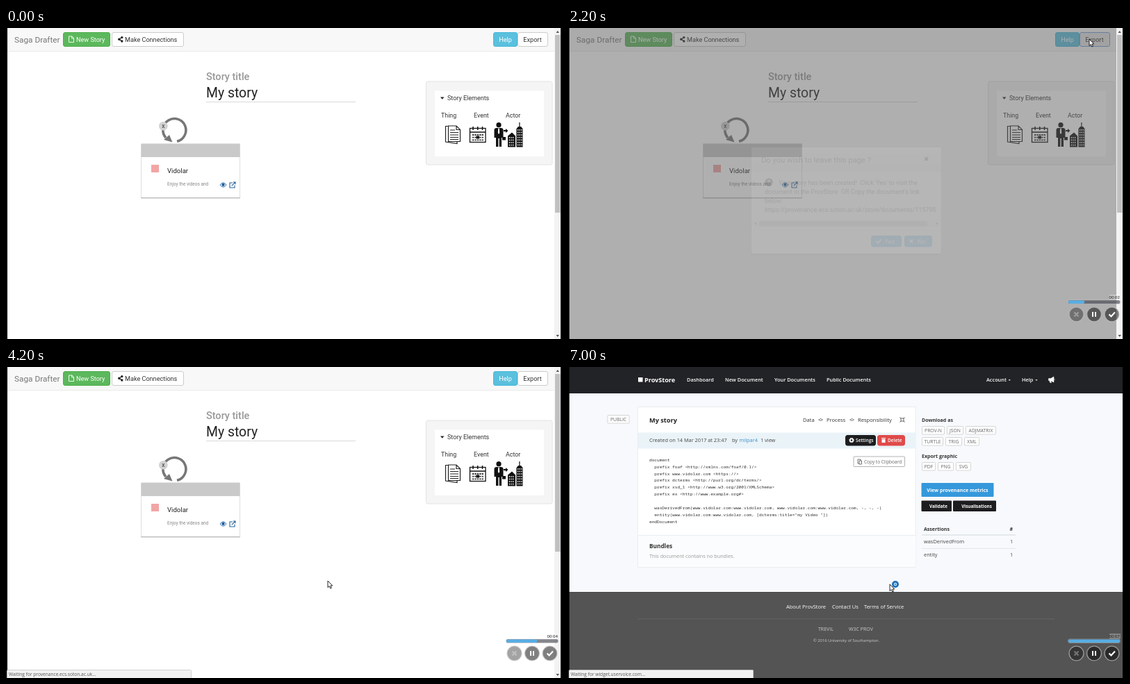
Write an HTML page that moves like this. It is 800 px wide and 448 px high and loops after 7100 ms.

```html
<!DOCTYPE html>
<html lang="en">
<head>
<meta charset="utf-8">
<title>Story export</title>
<style>
html, body { margin: 0; width: 100%; height: 100%; overflow: hidden; background: #000; }
svg { display: block; width: 800px; height: 448px; }
text { white-space: pre; }
.roboto { font-family: Roboto, sans-serif; }
.open { font-family: "Open Sans", sans-serif; }
.mono { font-family: "Noto Sans Mono", monospace; }
</style>
</head>
<body>
<svg id="stage" viewBox="0 0 800 448"></svg>
<script>
const LOOP = 7100, STEP = 100;

const text = (x, y, size, fill, str, attrs = '') =>
  `<text x="${x}" y="${y}" font-size="${size}" fill="${fill}" ${attrs}>${str.replace(/</g, '&lt;')}</text>`;
const rect = (x, y, w, h, fill, attrs = '') =>
  `<rect x="${x}" y="${y}" width="${w}" height="${h}" fill="${fill}" ${attrs}/>`;
const path = (d, fill, attrs = '') => `<path d="${d}" fill="${fill}" ${attrs}/>`;
const line = (d, color, width = 1, attrs = '') =>
  path(d, 'none', `stroke="${color}" stroke-width="${width}" ${attrs}`);
const circle = (x, y, r, fill, attrs = '') => `<circle cx="${x}" cy="${y}" r="${r}" fill="${fill}" ${attrs}/>`;
const group = (id, body, attrs = '') => `<g id="${id}" ${attrs}>${body}</g>`;
const at = (x, y, body) => `<g transform="translate(${x} ${y})">${body}</g>`;
const button = (x, y, w, h, fill, border, attrs = '') =>
  rect(x + .5, y + .5, w - 1, h - 1, fill, `rx="2.5" stroke="${border}" ${attrs}`);
const MID = ' text-anchor="middle" ', BOLD = ' font-weight="700" ', SEMI = ' font-weight="600" ';

function windows(x, y, cols, rows) {
  let out = '';
  for (let i = 0; i < cols * rows; i++)
    out += rect(x + i % cols * 2.6, y + Math.floor(i / cols) * 3.6, 1.3, 1.7, '#fff');
  return out;
}

const navBar = () =>
  rect(2, 0, 787, 34, '#f8f8f8') + rect(2, 33.3, 787, .8, '#e7e7e7') +
  text(12, 21, 11.8, '#777', 'Saga Drafter') +
  button(82, 6, 68, 21, '#5cb85c', '#4cae4c') +
  line('M90.5 12H95L97.5 14.5V20.5H90.5ZM94.7 12V15H97.5', '#fff', .9) +
  text(101, 19.7, 9.1, '#fff', 'New Story') +
  button(152, 6, 104, 21, '#fff', '#ccc') +
  line('M167 13.5L162.5 16.3L167 19', '#222', 1.1) +
  circle(166.8, 13.6, 1.7, '#222') + circle(162.8, 16.3, 1.7, '#222') + circle(166.8, 19, 1.7, '#222') +
  text(171, 19.7, 9.1, '#333', 'Make Connections') +
  button(701, 6, 35, 21, '#5bc0de', '#46b8da') + text(718.5, 19.7, 9.1, '#fff', 'Help', MID) +
  button(736, 6, 44, 21, '#fff', '#ccc', 'id="export"') + text(757.5, 19.7, 9.1, '#333', 'Export', MID);

const storyCard = () =>
  line('M246 163.2A16.5 16.5 0 1 0 230 158', '#777', 3.6) + path('M227 161L239.5 164.5L235 154Z', '#777') +
  circle(226.3, 141.3, 6.3, '#d2d2d2') + text(226.3, 144.2, 8.5, '#333', 'x', MID) +
  rect(194, 167, 143, 78.5, '#000', 'opacity=".25" rx="1"') + rect(194.5, 167, 142, 77, '#fff') +
  rect(194.5, 166.5, 142, 19.5, '#c9c9c9') +
  rect(209, 197, 11, 11, '#f2a5a5') +
  text(232, 208.8, 9.6, '#222', 'Vidolar') +
  text(232, 226.6, 6.5, '#888', 'Enjoy the videos and') +
  path('M308 226Q312.5 219.5 317 226Q312.5 232.5 308 226Z', '#fff', 'stroke="#337ab7" stroke-width="1"') +
  circle(312.5, 225.7, 2.2, '#235f97') +
  line('M326 223H322V230H329V226.5M324.7 227.3L329.5 222.5M326.8 222H330V225.3', '#2b6299', 1.1);

const elementPanel = () =>
  rect(604.5, 77, 181.5, 120, '#f5f5f5', 'stroke="#e3e3e3" rx="2.5"') +
  rect(617, 90.5, 157, 94.5, '#fff') + path('M625 99.5H630.5L627.7 102.8Z', '#222') +
  text(635, 104.3, 9, '#333', 'Story Elements') +
  text(626, 129.3, 8.9, '#333', 'Thing') + text(673, 129.3, 8.9, '#333', 'Event') +
  text(719, 129.3, 8.9, '#333', 'Actor') +
  line('M637 141.5H632.5V164L649 166.5V164', '#222', 1.2) +
  path('M636.5 141H648L653.5 146.5V163.5H636.5ZM648 141V146.5H653.5', '#fff', 'stroke="#222" stroke-width="1.2"') +
  line('M639 147H646M639 150.5H651M639 154H651M639 157.5H651M639 160.5H651', '#222', 1.1) +
  rect(667.5, 144.5, 22.5, 20, '#fff', 'stroke="#111" stroke-width="1.3"') +
  line('M667.5 150H690M672 142V147M678.7 142V147M685.5 142V147', '#111', 1.5) +
  line('M671 154H687M671 157.7H687M671 161.3H687', '#333', 1.8, 'stroke-dasharray="2.3 1.1"') +
  rect(676.5, 155.5, 4.5, 4, '#111') +
  circle(709, 139.7, 3.6, '#111') +
  path('M702.5 147Q702.5 144 706 144H712Q715.5 144 715.5 147V158H713V171H709.7V159H708.3V171H705V158H702.5Z', '#111') +
  path('M708.2 144.5H709.8L710.2 151L709 153L707.8 151Z', '#fff') +
  rect(714, 157, 5, 4.5, '#111') +
  path('M716 147H719V145L722.5 148L719 151V149H716Z', '#111') +
  path('M722 171.5V155.5L728 150.5L733 155.5V171.5Z', '#111') + windows(723.8, 157, 3, 4) +
  path('M734.5 171.5V145L737 142H738.3V136H739.5V142H741L743.5 145V171.5Z', '#111') + windows(736, 146, 3, 7);

const storyPage = () =>
  rect(2, 0, 787, 448, '#fff') + navBar() +
  text(288, 74.5, 14.5, '#999', 'Story title', 'font-weight="500"') +
  text(288, 99.7, 19.4, '#222', 'My story') + rect(288, 106, 215, .9, '#d5d5d5') +
  storyCard() + elementPanel() +
  group('shade', rect(2, 0, 787, 448, '#616161')) +
  rect(789, 0, 9, 448, '#f3f3f3') + rect(790, 10, 7.5, 256, '#c1c1c1') +
  path('M791.5 7H796L793.7 4ZM791.5 442H796L793.7 445Z', '#555');

const dialog = () =>
  rect(263.5, 172, 274, 154.5, '#000', 'opacity=".22" rx="2"') +
  rect(264, 172, 273, 153, '#fff', 'rx="2"') +
  rect(264, 172, 273, 34.5, 'url(#head)', 'rx="2"') + rect(264, 206, 273, .8, '#d5d8dd') +
  text(278, 193.5, 11.2, '#333', 'Do you wish to leave this page ?') +
  line('M513.4 186L518 190.8M518 186L513.4 190.8', '#111', 1.8) +
  circle(289, 222.3, 5.8, '#111') + text(289, 225.7, 9.5, '#fff', '?', MID + BOLD) +
  ["Your story has been created!  Click 'Yes' to visit the",
   "document in the ProvStore  OR Copy the document's link",
   'below:', 'https://provenance.ecs.soton.ac.uk/store/documents/115798']
    .map((s, i) => text(i ? 283 : 303, 225.6 + i * 13, 8.95, '#333', s)).join('') +
  rect(265, 277.5, 271, 8.5, '#f1f1f1') + rect(275, 278, 242, 7.5, '#c1c1c1') +
  path('M271 279.7V283.7L268.5 281.7ZM530 279.7V283.7L532.5 281.7Z', '#555') +
  rect(264, 291.5, 273, .6, '#e8e8e8') +
  button(436, 299, 44, 16.5, '#2196e3', '#2196e3', 'id="yes"') + text(455.5, 310.7, 9, '#fff', 'Yes') +
  line('M443.5 307L446.2 309.6L450.7 304.3', '#fff', 1.8) +
  button(484, 299, 40, 16.5, '#2196e3', '#2196e3') + text(503, 310.7, 9, '#fff', 'No') +
  line('M491.7 304.8L496.2 309.5M496.2 304.8L491.7 309.5', '#fff', 1.8);

const tag = (x, y, w, str) =>
  rect(x + .5, y + .5, w - 1, 11.5, '#fff', 'stroke="#ccc" stroke-width=".8" rx="1"') +
  text(x + w / 2, y + 8.8, 6.8, '#666', str, MID);
const diamond = x => line(`M${x - 3.5} 76H${x + 3.5}`, '#555', .7) +
  path(`M${x} 74L${x + 2} 76L${x} 78L${x - 2} 76Z`, '#fff', 'stroke="#555" stroke-width=".8"');

const storeHeader = () =>
  rect(2, 0, 796, 38, '#222326') + rect(101, 15, 6.5, 6.5, '#fff') +
  text(110, 22, 9.1, '#fff', 'ProvStore', BOLD) +
  [[171, 'Dashboard'], [226, 'New Document'], [297, 'Your Documents'], [372, 'Public Documents'],
   [602, 'Account'], [653, 'Help']].map(([x, s]) => text(x, 21.3, 7.35, '#fff', s, SEMI)).join('') +
  path('M633.5 18H637L635.2 20ZM672.3 18H675.8L674 20Z', '#ccc') +
  path('M691.5 16.5H694.5L699 14V22L694.5 19.8L695.5 22.5H693.7L692.7 19.6H691.5ZM700 16.8V19.2', '#fff', 'stroke="#fff" stroke-width=".5"');

const CODE = [
  'document',
  '  prefix foaf <http://xmlns.com/foaf/0.1/>',
  '  prefix www.vidolar.com <https://>',
  '  prefix dcterms <http://purl.org/dc/terms/>',
  '  prefix xsd_1 <http://www.w3.org/2001/XMLSchema>',
  '  prefix ex <http://www.example.org#>',
  '',
  '  wasDerivedFrom(www.vidolar.com:www.vidolar.com, www.vidolar.com:www.vidolar.com, -, -, -)',
  '  entity(www.vidolar.com:www.vidolar.com, [dcterms:title="my Video "])',
  'endDocument'
];

const documentCard = () =>
  tag(56.5, 69, 32, 'PUBLIC') +
  rect(100.5, 57.5, 399.5, 231, '#fff', 'stroke="#e6eaee" stroke-width=".8"') +
  text(117, 79.5, 9.2, '#222', 'My story', BOLD) +
  text(338, 79, 7.6, '#333', 'Data') + text(372, 79, 7.6, '#333', 'Process') +
  text(417, 79, 7.6, '#333', 'Responsibility') + diamond(363.5) + diamond(408.5) +
  rect(479, 74, 4, 4, 'none', 'stroke="#555" stroke-width=".9"') +
  line('M477.5 72.5L479 74M484.5 72.5L483 74M477.5 79.5L479 78M484.5 79.5L483 78', '#555') +
  rect(101, 94.5, 399, 23, '#eaf3f8') +
  text(117, 107.8, 7.35, '#444', 'Created on 14 Mar 2017 at 23:47') + text(236, 107.8, 7.35, '#444', 'by') +
  text(246.5, 107.8, 7.35, '#3a8fc9', 'milpar4') + text(277, 107.8, 7.35, '#444', '1 view') +
  button(399, 98, 44, 15.5, '#1d1d1f', '#1d1d1f') +
  circle(408, 105.5, 2.2, 'none', 'stroke="#fff" stroke-width="1.7"') +
  circle(408, 105.5, 3.3, 'none', 'stroke="#fff" stroke-width="1" stroke-dasharray="1.3 1.29"') +
  text(414, 108.1, 6.6, '#fff', 'Settings', SEMI) +
  button(445, 98, 40, 15.5, '#e04a4a', '#e04a4a') +
  rect(451.5, 104, 5, 5, '#fff') + rect(451, 102, 6, 1.2, '#fff') +
  text(460, 108.1, 6.6, '#fff', 'Delete', SEMI) +
  `<g class="mono">${CODE.map((s, i) => text(117, 135.7 + i * 9.93, 6.14, '#333', s)).join('')}</g>` +
  rect(411, 129, 73.5, 14.5, '#fff', 'stroke="#aaa" stroke-width=".9" rx="1"') +
  line('M417 133H421V135M417 133V139H419M419 135H422.5V140H419Z', '#555', .8) +
  text(426, 138.7, 6.5, '#666', 'Copy to Clipboard') +
  rect(101, 242, 399, 46, '#fbfcfd') + rect(101, 242, 399, .8, '#e8ecef') +
  text(117, 261, 8.25, '#333', 'Bundles', BOLD) +
  text(117, 275.3, 7.25, '#999', 'This document contains no bundles.');

const sidebar = () =>
  text(509, 79, 7.05, '#333', 'Download as', BOLD) +
  tag(509, 85, 33, 'PROV-N') + tag(545, 85, 24, 'JSON') + tag(572, 85, 44, 'ADJMATRIX') +
  tag(509, 101, 31, 'TURTLE') + tag(543, 101, 24, 'TRIG') + tag(570, 101, 22, 'XML') +
  text(509, 131.3, 7.05, '#333', 'Export graphic', BOLD) +
  tag(509, 137, 20, 'PDF') + tag(532, 137, 23, 'PNG') + tag(558, 137, 22, 'SVG') +
  rect(508.5, 167, 104, 20, '#3498db', 'rx="1"') +
  text(560.5, 179.5, 7.05, '#fff', 'View provenance metrics', MID + BOLD) +
  rect(508.5, 192.5, 43.5, 15.5, '#1d1d1f', 'rx="1"') + text(533, 202.7, 6.3, '#fff', 'Validate', MID + BOLD) +
  rect(554, 192.5, 62, 15.5, '#1d1d1f', 'rx="1"') + text(588, 202.7, 6.3, '#fff', 'Visualisations', MID + BOLD) +
  text(512, 235.5, 7.05, '#333', 'Assertions', BOLD) + text(635.5, 235.5, 7.05, '#333', '#', BOLD) +
  text(512, 254, 7.4, '#444', 'wasDerivedFrom') + text(636, 254, 7.4, '#444', '1') +
  text(512, 273, 7.4, '#444', 'entity') + text(636, 273, 7.4, '#444', '1') +
  rect(509, 241.5, 135, 1, '#d5d9dc') + rect(509, 261, 135, .8, '#dfe3e6');

const storeFooter = () =>
  rect(2, 324, 796, 124, '#545454') + rect(2, 324, 796, 1, '#484848') +
  text(314, 348.3, 7.5, '#fff', 'About ProvStore') + text(380, 348.3, 7.5, '#fff', 'Contact Us') +
  text(426, 348.3, 7.5, '#fff', 'Terms of Service') + rect(100, 362.5, 600, .8, '#686868') +
  text(360, 380.3, 7, '#ccc', 'TREVIL') + text(404, 380.3, 7, '#ccc', 'W3C PROV') +
  text(400.5, 395.5, 5.8, '#ccc', '© 2016 University of Southampton.', MID);

const storePage = () =>
  rect(2, 0, 796, 448, '#f7f9fc') + storeHeader() + documentCard() + sidebar() + storeFooter();

const statusBar = () =>
  rect(1.5, 436.5, 265, 13, '#f1f1f1', 'stroke="#c8c8c8" stroke-width=".8" rx="1"') +
  text(4, 445.3, 6.6, '#555', '', 'id="statusText"');

const disc = (x, alpha) =>
  circle(x, 412.5, 10.4, `rgba(0,0,0,${alpha})`, 'stroke="rgba(190,190,190,.7)" stroke-width="1.3"');
const recorder = () =>
  rect(779, 384, 16, 7.5, 'rgba(255,255,255,.28)') +
  text(794, 389.8, 6.2, '#222', '', 'id="clock" text-anchor="end"') +
  rect(719.5, 392, 75, 5.5, 'rgba(70,70,80,.65)', 'rx="2.5" stroke="rgba(220,220,220,.5)" stroke-width=".8"') +
  rect(720, 392.5, 0, 4.5, '#58aee4', 'id="progress" rx="2"') +
  disc(731.5, .36) + disc(757, .5) + disc(782.5, .5) +
  line('M728.5 409.5L734.5 415.5M734.5 409.5L728.5 415.5', 'rgba(255,255,255,.3)', 2.4) +
  line('M755 409V416M759 409V416', '#fff', 2) +
  line('M778.5 412.5L781.5 415.5L787 409.5', '#fff', 2.2);

const outline = 'stroke="#111" stroke-width=".9" stroke-linejoin="round"';
const pointer = () =>
  group('arrow', path('M0 0V9.6L2.2 7.6L3.8 11L5.4 10.3L3.9 7H6.8Z', '#fff', outline)) +
  group('hand', at(0, 1, path('M2.6 1Q3.6 -.6 4.6 1V5Q5.8 4.2 6.4 5.3Q7.6 4.7 8 5.8Q9.4 5.4 9.4 7V9.5L8.4 12.5H3.6L.4 8.6Q-.2 7 1.2 7L2.6 8.2Z', '#fff', outline))) +
  group('busy', at(8, 0, circle(0, 0, 5, '#1d72b8') + circle(0, 0, 2.2, '#cfe9fb') + circle(0, 0, 1, '#1d72b8')));

document.getElementById('stage').innerHTML =
  '<defs><linearGradient id="head" x2="0" y2="1"><stop stop-color="#fff"/><stop offset="1" stop-color="#e4e7ee"/></linearGradient></defs>' +
  rect(0, 0, 800, 448, '#000') +
  group('story', storyPage() + group('dialog', dialog()), 'class="roboto"') +
  group('store', storePage(), 'class="open"') +
  group('status', statusBar(), 'class="open"') +
  group('recorder', recorder(), 'class="roboto"') +
  group('pointer', pointer());

const el = id => document.getElementById(id);
const show = (id, on) => el(id).setAttribute('visibility', on ? 'visible' : 'hidden');
const fade = (id, v) => el(id).setAttribute('opacity', v);
const paint = (id, fill, stroke) => { el(id).setAttribute('fill', fill); el(id).setAttribute('stroke', stroke); };
const ramp = (t, a, b) => Math.min(1, Math.max(0, (t - a) / (b - a)));
const smooth = v => v * v * (3 - 2 * v);

// Pointer stops: time, x, y
const STOPS = [[500, 640, 250], [1600, 750, 16], [2300, 750, 16], [3100, 463, 308]];
function pointerAt(t) {
  let [, x, y] = STOPS[0];
  for (let i = 1; i < STOPS.length; i++) {
    const k = smooth(ramp(t, STOPS[i - 1][0], STOPS[i][0]));
    x += (STOPS[i][1] - STOPS[i - 1][1]) * k;
    y += (STOPS[i][2] - STOPS[i - 1][2]) * k;
  }
  return [x, y];
}

function draw(t) {
  const loaded = t >= 6000, started = t >= 100;
  const closing = 1 - ramp(t, 3500, 3900);
  show('story', !loaded);
  show('store', loaded);
  fade('shade', t >= 2200 ? .5 * closing : 0);
  fade('dialog', ramp(t, 2160, 2600) * closing);

  const overExport = t >= 1600 && t < 2200, overYes = t >= 3100 && t < 3600;
  const focused = t >= 2000 && t < 2400;
  paint('export', overExport || focused ? '#e6e6e6' : '#fff', focused ? '#6f9fd8' : overExport ? '#adadad' : '#ccc');
  paint('yes', overYes ? '#1f76b5' : '#2196e3', overYes ? '#14507c' : '#2196e3');

  show('status', loaded || t >= 3900 && t < 5300);
  el('statusText').textContent = `Waiting for ${loaded ? 'widget.uservoice.com' : 'provenance.ecs.soton.ac.uk'}...`;

  show('recorder', started);
  el('clock').textContent = '00:0' + Math.floor(t / 1000);
  el('progress').setAttribute('width', Math.min(74, 74 * t / 7000));

  const [x, y] = pointerAt(t), hand = overExport || overYes;
  el('pointer').setAttribute('transform', `translate(${x} ${y + (loaded ? 5 : 0)})`);
  show('arrow', started && !hand);
  show('hand', started && hand);
  show('busy', loaded);
}

function tick() {
  draw(Math.floor(performance.now() % LOOP / STEP) * STEP);
  requestAnimationFrame(tick);
}
tick();
</script>
</body>
</html>
```
